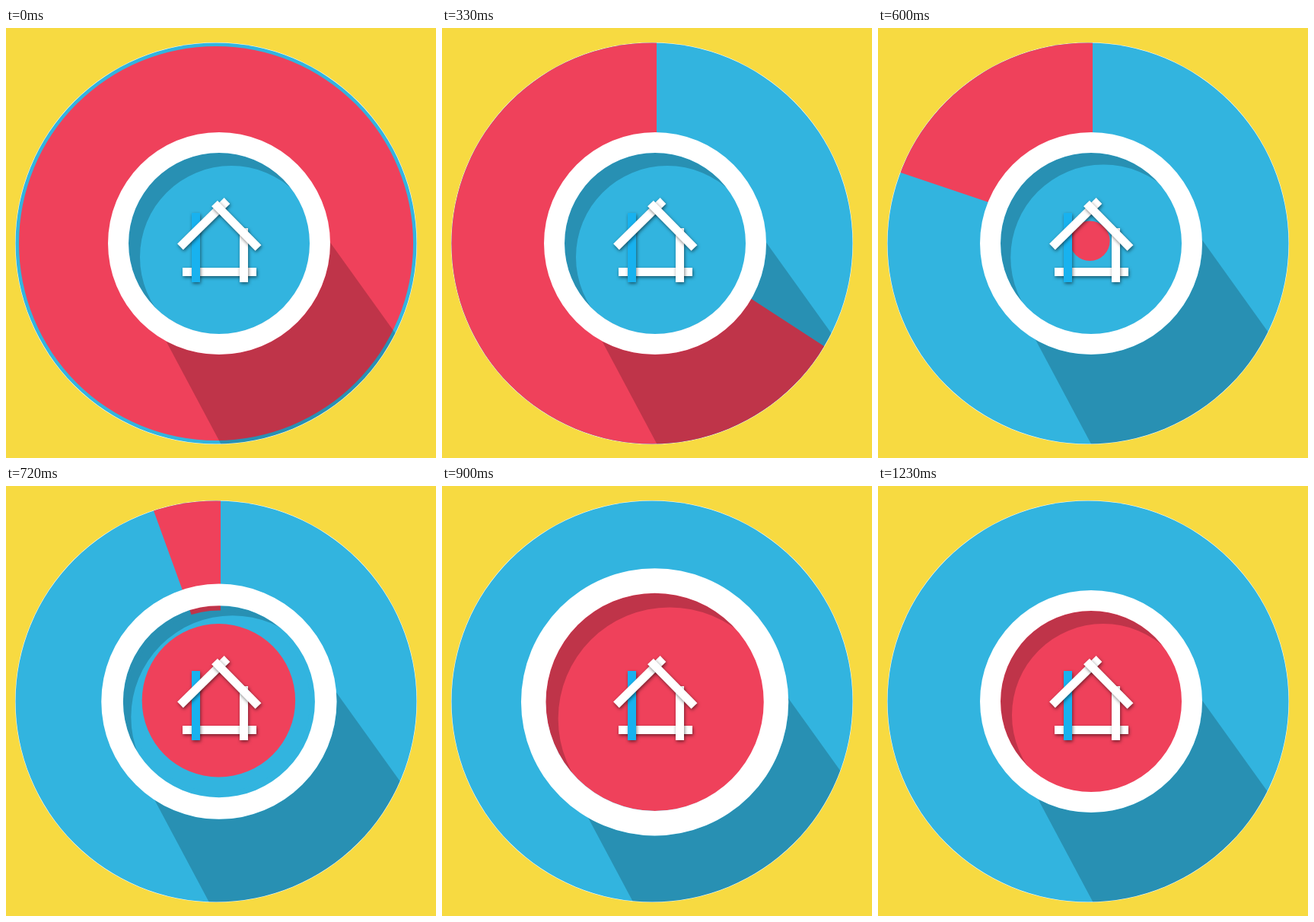
An HTML page with a canvas for the animation above (1.29 s loop, 565x565 px).

```html
<!DOCTYPE html>
<html lang="en">
<head>
<meta charset="utf-8">
<title>Home button</title>
<style>
  html, body { margin: 0; width: 100%; height: 100%; overflow: hidden; background: #f7da41; }
  canvas { display: block; }
</style>
</head>
<body>
<canvas id="stage" width="565" height="565"></canvas>
<script>
const ctx = document.getElementById('stage').getContext('2d');
const YELLOW = '#f7da41', PINK = '#ef415b', BLUE = '#32b4df', SHADE = 'rgba(0,0,0,.2)';
const LOOP = 1290, STEP = 30, LAST = 41;
const PIVOT = { x: 282, y: 279 };

// Eased progress between two steps
function ease(step, from, to) {
  const u = Math.min(1, Math.max(0, (step - from) / (to - from)));
  return u * u * (3 - 2 * u);
}

function circle(x, y, r) {
  const path = new Path2D();
  path.arc(x, y, r, 0, Math.PI * 2);
  return path;
}

// Circle scaled about the pivot
function scaled(x, y, r, s) {
  return circle(PIVOT.x + (x - PIVOT.x) * s, PIVOT.y + (y - PIVOT.y) * s, r * s);
}

function fill(path, color, rule = 'nonzero') {
  ctx.fillStyle = color;
  ctx.fill(path, rule);
}

function clipped(path, rule, draw) {
  ctx.save();
  ctx.clip(path, rule);
  draw();
  ctx.restore();
}

function bar(x1, y1, x2, y2, color = '#fff') {
  ctx.strokeStyle = color;
  ctx.beginPath();
  ctx.moveTo(x1, y1);
  ctx.lineTo(x2, y2);
  ctx.stroke();
}

function drawHouse() {
  ctx.save();
  ctx.lineWidth = 11;
  ctx.shadowColor = 'rgba(0,0,0,.5)';
  ctx.shadowBlur = 4;
  ctx.shadowOffsetX = 1;
  ctx.shadowOffsetY = 2;
  bar(232, 320.5, 329, 320.5);
  bar(312.5, 263, 312.5, 334);
  bar(249.5, 243, 249.5, 334, '#18b2ef');
  bar(229, 287.5, 290.5, 227);
  bar(274, 230.5, 331.5, 289);
  ctx.restore();
}

const disc = circle(276, 283, 263.5);

function drawSweep(step) {
  fill(circle(276, 283, 264), '#fff');
  fill(disc, BLUE);
  if (step === 0) return fill(circle(276, 283, 259), PINK);
  const turn = ease(step, 0, 28);
  if (turn === 1) return;
  const wedge = new Path2D();
  wedge.moveTo(282, 275);
  wedge.arc(282, 275, 400, (turn * 2 - .5) * Math.PI, 1.5 * Math.PI);
  clipped(disc, 'nonzero', () => fill(wedge, PINK));
}

function drawLongShadow(ringEdge, s) {
  const outside = new Path2D();
  outside.rect(0, 0, 565, 565);
  outside.addPath(ringEdge);
  const beam = new Path2D();
  for (const [x, y] of [[-89, 100], [71, 400], [357, 300], [120.5, -30]])
    beam.lineTo(PIVOT.x + x * s, PIVOT.y + y * s);
  clipped(disc, 'nonzero', () => clipped(outside, 'evenodd', () => fill(beam, SHADE)));
}

function draw(step) {
  const ringScale = 1 + .203 * (ease(step, 20.67, 30) - ease(step, 32.5, 41));
  const shadeScale = 1 + .22 * (ease(step, 18, 30) - ease(step, 30, 41));
  const ringOuter = scaled(280, 283, 146, ringScale);
  const ringInner = scaled(280, 283, 119, ringScale);

  ctx.fillStyle = YELLOW;
  ctx.fillRect(0, 0, 565, 565);
  drawSweep(step);
  drawLongShadow(ringOuter, shadeScale);

  fill(circle(280, 283, 119.5), BLUE);
  const grow = ease(step, 17, 28);
  if (grow) fill(circle(278 + 2 * grow, 279 + 4 * grow, 144 * grow), PINK);

  const crescent = new Path2D();
  crescent.rect(0, 0, 565, 565);
  crescent.addPath(scaled(296, 301, 120, shadeScale));
  clipped(ringInner, 'nonzero', () => fill(crescent, SHADE, 'evenodd'));

  const ring = new Path2D(ringOuter);
  ring.addPath(ringInner);
  fill(ring, '#fff', 'evenodd');
  drawHouse();
}

const start = performance.now();
function tick() {
  const time = (performance.now() - start) % LOOP;
  draw(Math.min(LAST, Math.floor(time / STEP)));
  requestAnimationFrame(tick);
}
tick();
</script>
</body>
</html>
```
